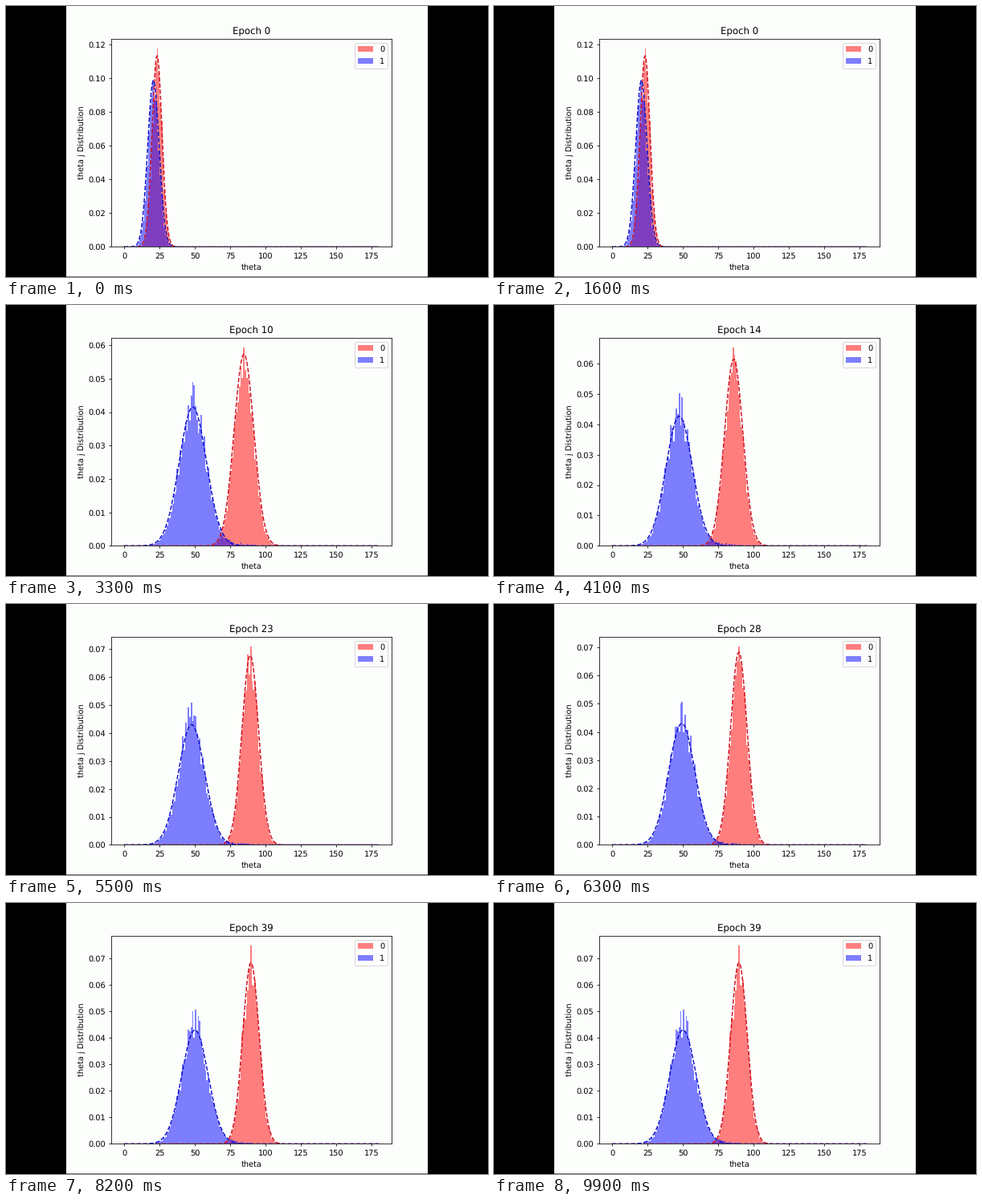
A matplotlib script that plays this animation: 600x338 px, repeating every 10000 ms.

```python
import numpy as np
import matplotlib.pyplot as plt
from matplotlib.animation import FuncAnimation
from matplotlib.patches import Rectangle

W, H, DPI = 600, 338, 70.3125
PAPER = "#fcfefc"
LAST_EPOCH = 39
EPOCHS_PER_S, START_S = 6, 1.62

edges = np.arange(181)
mids = edges[:-1] + .5
grid = np.linspace(0, 180, 500)


def rise(x, mid, width):
    return 1 / (1 + np.exp((mid - x) / width))


def normal(x, mean, peak):
    return peak * np.exp(-np.pi * (peak * (x - mean)) ** 2)


def bars(rng, mean, peak, room, squeeze):
    """Noisy normal, a little narrower than its fit, tallest at the mean."""
    x = mean + (mids - mean) / squeeze
    h = normal(x, mean, peak) * rng.uniform(.88, 1 + room, mids.size)
    h[h < 1e-4] = 0
    h[int(mean)] = peak * (1 + room)
    return h


def state(epoch):
    """Fast separation in the first epochs, then a slow drift."""
    rng = np.random.default_rng(epoch)
    start = np.exp(-1.2 * epoch)
    red = (84 - 60.8 * start + 5.6 * rise(epoch, 16, 3),
           .0544 + .0588 * start + .014 * rise(epoch, 14, 3))
    blue = (48.7 - 29.8 * start - 1.8 * np.cos(2 * np.pi * (epoch - 18) / 34),
            .04 + .0586 * start + .003 * rise(epoch, 10, 2))
    red_room = np.interp(epoch, (0, 5, 14, 23, 28, 39), (.037, 0, .062, .047, .029, .095))
    blue_room = .18 * (1 - start)
    heights = bars(rng, *red, red_room, .97), bars(rng, *blue, blue_room, .95)
    if epoch:
        mean, sd = blue[0], .4 / blue[1]
        heights[1][:] += .0012 * rng.random(180) * normal(mids, mean + 3 * sd, blue[1]) / blue[1]
    return heights, (normal(grid, *red), normal(grid, *blue))


plt.rcParams["text.hinting"] = "none"

# The small margin keeps the pixel size from rounding down
fig = plt.figure(figsize=((W + 1e-3) / DPI, (H + 1e-3) / DPI), dpi=DPI, facecolor="black")
fig.add_artist(Rectangle((75 / W, .5 / H), 450 / W, 337.5 / H,
                         fc=PAPER, lw=0, zorder=-1, snap=False))
ax = fig.add_axes([131.25 / W, (H - 300.4) / H, 348.75 / W, 259.7 / H], facecolor=PAPER)

fills = [ax.stairs(np.zeros(180), edges, fill=True, color=c, alpha=.5, label=name)
         for c, name in (("red", "0"), ("blue", "1"))]
lines = [ax.plot(grid, 0 * grid, "--", color=c, lw=1.5)[0]
         for c in ("#d01020", "#1010cc")]
ax.set_xlim(-9, 189)
ax.set_xlabel("theta")
ax.set_ylabel("theta j Distribution")
ax.legend(loc="upper right")
title = ax.set_title("Epoch 0")


def draw(i):
    epoch = int(np.clip((i / 10 - START_S) * EPOCHS_PER_S, 0, LAST_EPOCH))
    heights, curves = state(epoch)
    for fill, h in zip(fills, heights):
        fill.set_data(values=h)
    for line, y in zip(lines, curves):
        line.set_ydata(y)
    ax.set_ylim(0, 1.05 * max(a.max() for a in (*heights, *curves)))
    title.set_text(f"Epoch {epoch}")
    return [*fills, *lines, title]


anim = FuncAnimation(fig, draw, frames=100, interval=100, repeat=True,
                     repeat_delay=0, blit=False)
plt.show()
```
